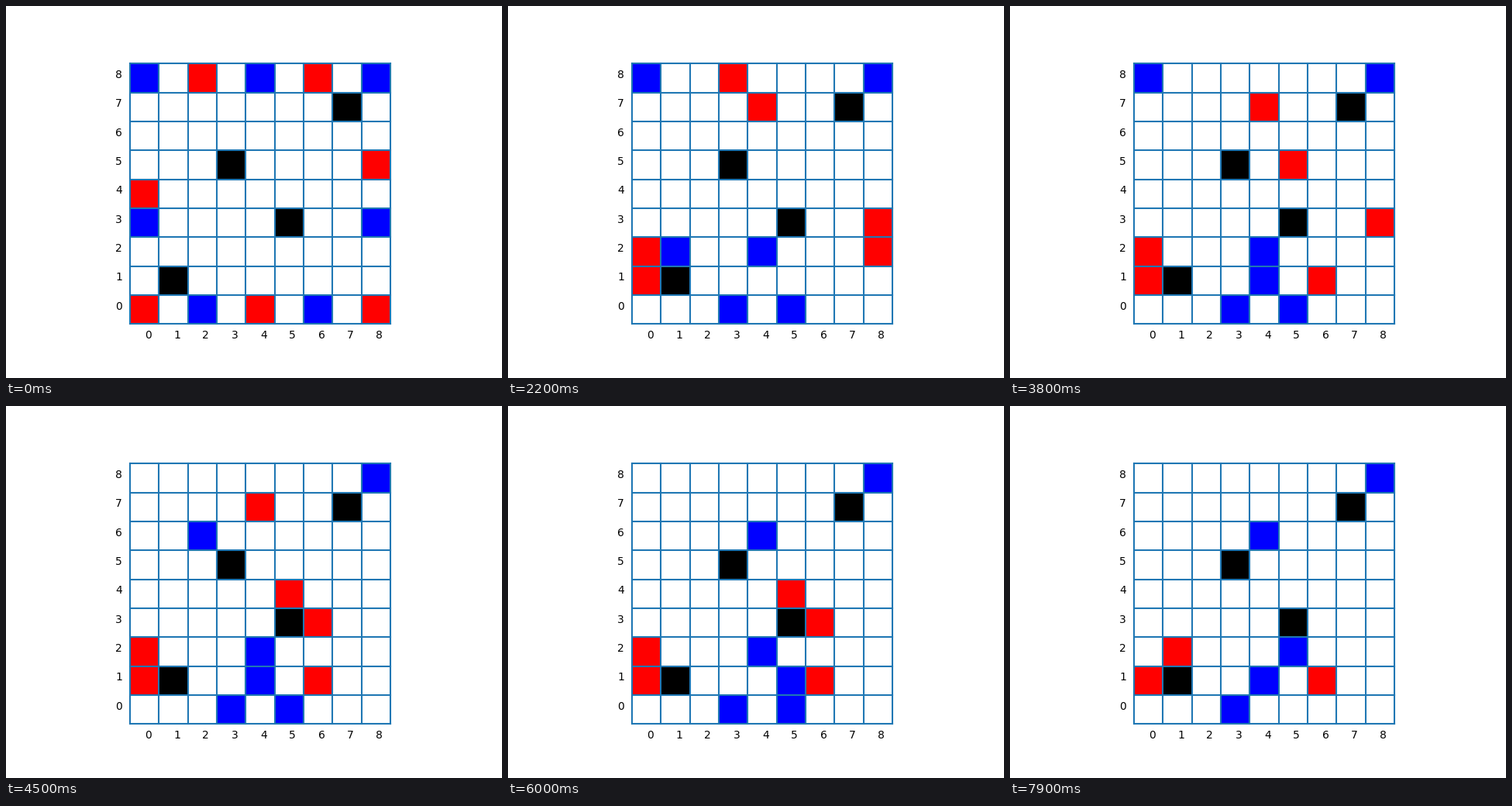
These frames come from a looping animation (640 by 480 pixels, 8 s). A matplotlib script:

```python
import matplotlib.pyplot as plt
from matplotlib.animation import FuncAnimation
from matplotlib.patches import Rectangle

SIZE = 9
FILES = "abcdefghi"
STEP = {"N": (0, 1), "S": (0, -1), "E": (1, 0), "W": (-1, 0)}

BLUE = "a8 e8 i8 a3 i3 c0 g0"
RED = "c8 g8 i5 a4 a0 e0 i0"
BLOCKS = "b1 f3 d5 h7"

# Square, compass direction, then "x" and the captured square; blue starts.
GAME = """
c0E i5S  g0Wxe0 i0N  i3W i4S  a3E a4S  b3S a3S  h3S i1N
e8S g8W  e7N c8Exe8  h2W a0N  g2W f8S  f2W f7W
e2S d8E  b2E i2W  c2N h2S  c3N h1W  c4E e7E
d4E e8S  e4S f7S  e3S f6S  a8E f5S  b8S i3W  b7E h3W
c7S e7S  c6E e6S  d6E g1N  e1E g2S  e2N g3N
e3Nxe5 g4S  e4S g1N  e3S g2S  e2N g3S  f1W g2W
e1E f2W  f1Wxe2 f4E  e1E g4S  f1N g3S  f0N g2N
f1W g3Sxf2  e3Sxg2 a2E  e2E
"""


def square(name):
    return FILES.index(name[0]), int(name[1])


def play(board, move):
    step, _, taken = move.partition("x")
    x, y = square(step[:2])
    dx, dy = STEP[step[2]]
    after = dict(board)
    after[x + dx, y + dy] = after.pop((x, y))
    if taken:
        del after[square(taken)]
    return after


start = {}
for names, color in ((BLUE, "blue"), (RED, "red"), (BLOCKS, "black")):
    start.update((square(n), color) for n in names.split())

boards = [start]
for move in GAME.split():
    boards.append(play(boards[-1], move))

fig, ax = plt.subplots(figsize=(6.4, 4.8), dpi=100)
ax.set_aspect("equal")
ax.axis("off")

for i in range(SIZE + 1):
    ax.plot([0, SIZE], [i, i], color="#1f77b4", lw=1.5)
    ax.plot([i, i], [0, SIZE], color="#1f77b4", lw=1.5)
for i in range(SIZE):
    ax.text(i + 0.5, -0.5, str(i))
    ax.text(-0.5, i + 0.5, str(i))
ax.set(xlim=(-0.45, 9.45), ylim=(-0.45, 9.45))

cells = {}
for x in range(SIZE):
    for y in range(SIZE):
        cells[x, y] = ax.add_patch(Rectangle((x, y), 1, 1, lw=0, zorder=1))


def draw(frame):
    board = boards[frame]
    for pos, cell in cells.items():
        cell.set_facecolor(board.get(pos, "white"))
    return list(cells.values())


anim = FuncAnimation(fig, draw, frames=len(boards), interval=100,
                     repeat=True, repeat_delay=0)
plt.show()
```
